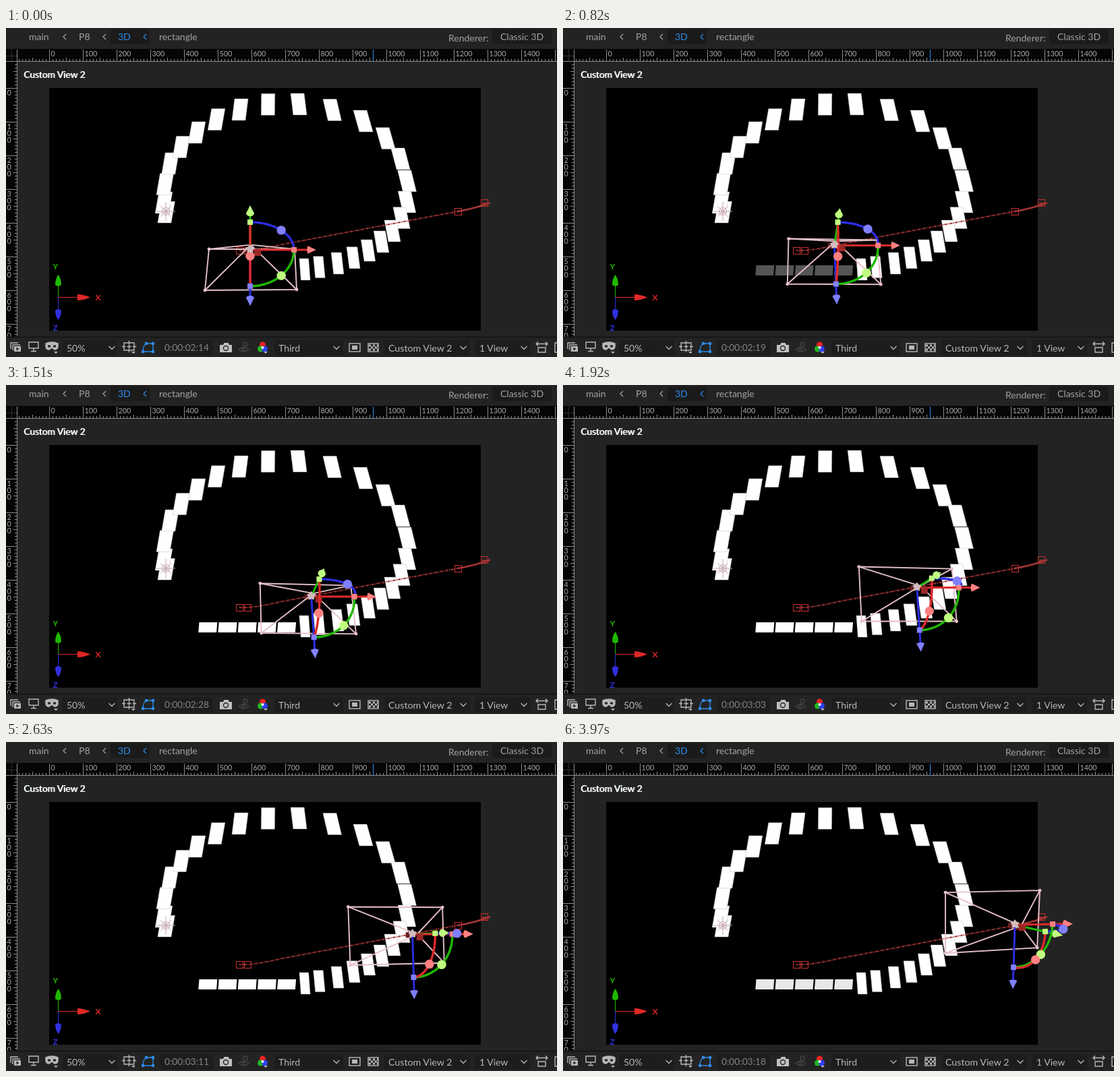
Write an HTML page with a canvas that moves like this. It is 817 by 488 pixels and loops after 4120 ms.

```html
<!DOCTYPE html>
<html lang="en">
<head>
<meta charset="utf-8">
<title>Camera move</title>
<style>
html, body { margin: 0; width: 100%; height: 100%; overflow: hidden; background: #232323; }
svg, canvas { position: absolute; left: 0; top: 0; width: 817px; height: 488px; }
text { font: 14px Lato, sans-serif; fill: #a3a3a3; }
.rule text { font-size: 10.8px; fill: #a8a8a8; }
.bar text { fill: #b8b8b8; }
.axis text { font-size: 12px; font-weight: bold; fill: inherit; }
.title { font-size: 13.7px; }
</style>
</head>
<body>
<svg viewBox="0 0 817 488" xmlns="http://www.w3.org/2000/svg">
  <rect width="817" height="488" fill="#232323"/>

  <!-- header -->
  <g fill="#1b1b1b">
    <rect x="155" y="2" width="58" height="22" rx="2"/>
    <rect x="721" y="2" width="88" height="22" rx="2"/>
  </g>
  <text x="34" y="18">main</text>
  <text x="108" y="18">P8</text>
  <text x="166" y="18" style="fill:#2d8ceb">3D</text>
  <text x="227" y="18">rectangle</text>
  <text x="656" y="20">Renderer:</text>
  <text x="733" y="18">Classic 3D</text>
  <path d="M89 9l-4 4 4 4M148 9l-4 4 4 4" fill="none" stroke="#a3a3a3" stroke-width="1.2"/>
  <path d="M208 9l-4 4 4 4" fill="none" stroke="#2d8ceb" stroke-width="1.2"/>

  <!-- rulers -->
  <path d="M0 31H817V50H17V458H0z" fill="#050505"/>
  <g id="rule" class="rule"></g>

  <!-- viewport -->
  <rect x="64" y="89" width="640" height="360" fill="#000"/>
  <text class="title" x="27" y="74" style="fill:#d4e2ec">Custom View 2</text>
  <text class="title" x="26" y="74" style="fill:#fff">Custom View 2</text>
  <g id="row"></g>
  <g id="tiles" fill="#fff" stroke="#bbb" stroke-width=".5"></g>
  <g id="light" fill="none" stroke="#c0a0a8"></g>
  <g id="track" fill="none" stroke="#a03434"></g>

  <!-- axis widget -->
  <g class="axis">
    <g fill="#20b800"><path d="M77.500 399V378" stroke="#20b800"/><path d="M73 381q0-9 4.500-15q4.500 6 4.500 15q-4.500 4-9 0z"/><text x="69.500" y="358">Y</text></g>
    <g fill="#3030e0"><path d="M77.500 399V420" stroke="#3030e0"/><path d="M73 419q4.500-4 9 0q0 8-4.500 14q-4.500-6-4.500-14z"/><text x="69.500" y="449">Z</text></g>
    <g fill="#e02828"><path d="M78 399.500H108" stroke="#e02828"/><path d="M106 395q8 0 19 4.500q-11 4.500-19 4.500z"/><text x="132.500" y="404">X</text></g>
  </g>

  <!-- toolbar -->
  <rect y="458" width="817" height="30" fill="#232323"/>
  <rect y="457.500" width="817" height="2" fill="#161616"/>
  <g fill="#1d1d1d">
    <rect x="84" y="463" width="81" height="23"/><rect x="228" y="463" width="79" height="23"/>
    <rect x="398" y="463" width="102" height="23"/><rect x="561" y="463" width="127" height="23"/>
    <rect x="695" y="463" width="82" height="23"/>
  </g>
  <g class="bar">
    <text x="90" y="480">50%</text>
    <text id="code" x="235" y="479" style="fill:#858585;font-size:13.700px"></text>
    <text x="404" y="480">Third</text>
    <text x="567" y="480" style="font-size:14.200px">Custom View 2</text>
    <text x="702" y="480">1 View</text>
  </g>
  <path id="downs" fill="none" stroke="#b0b0b0" stroke-width="1.4"/>
  <g fill="none" stroke="#b8b8b8" stroke-width="1.4">
    <path d="M7 476v-9h11M10 478v-8h11"/>
    <rect x="12" y="472" width="10" height="8" fill="#b8b8b8" stroke="none"/><path d="M15.500 473.500v5l4-2.500z" fill="#232323" stroke="none"/>
    <path d="M34 466h14v9h-14zM41 475v4M37 479.500h8"/>
    <path d="M59 468q9-4 18 0v5q-1 4-5 4l-4-3-4 3q-4 0-5-4z" fill="#b8b8b8"/>
    <path d="M62 472h4M70 472h4" stroke="#232323" stroke-width="3"/>
    <path d="M71 480h6l-3 3zM186 480h6l-3 3z" fill="#b8b8b8" stroke="none"/>
    <path d="M175 467h15v11h-15zM182.500 464v5M182.500 476v5M172 472.500h5M188 472.500h5M179.500 472.500h6M182.500 469.500v6"/>
    <path d="M203 480q0-9 5-12h10v12z" stroke="#2d8ceb"/>
    <path d="M201 478h4v4h-4zM206 466h4v4h-4zM216 466h4v4h-4zM216 478h4v4h-4z" fill="#2d8ceb" stroke="none"/>
    <path d="M317 470h5l1.500-3h6l1.500 3h4v11h-18z" fill="#c0c0c0" stroke="none"/>
    <circle cx="326" cy="475" r="3.500" stroke="#232323"/>
    <g stroke="#424242"><circle cx="355" cy="469" r="3"/><path d="M345 477q7-7 15 0q-7 6-15 0z"/><circle cx="352" cy="477" r="2"/></g>
    <g stroke="none"><circle cx="380.500" cy="470" r="4.500" fill="#f02020"/><circle cx="377.500" cy="476" r="4.500" fill="#20b820"/><circle cx="383.500" cy="476" r="4.500" fill="#3040f0"/><circle cx="380.500" cy="474" r="2" fill="#fff"/><path d="M382 480h6l-3 3z" fill="#b8b8b8"/></g>
    <rect x="509" y="468" width="16" height="12"/><rect x="513" y="471" width="8" height="6" fill="#b8b8b8" stroke="none"/>
    <rect x="537" y="468" width="15" height="12"/><path d="M538 471h14M538 477h14" stroke-dasharray="3" stroke-width="3"/><path d="M541 474h11" stroke-dasharray="3" stroke-width="3"/>
    <path d="M786 468.500h17M789 465.500l-3 3 3 3M800 465.500l3 3-3 3M789 474h11v7h-11z"/>
    <path d="M817 467h-3v14h3"/>
  </g>
</svg>
<canvas id="rig" width="817" height="488"></canvas>

<script>
const $ = id => document.getElementById(id);
const line = (x1, y1, x2, y2, c = '#8c8c8c') =>
  `<path d="M${x1} ${y1}L${x2} ${y2}" stroke="${c}"/>`;
const label = (x, y, s) => `<text x="${x}" y="${y}">${s}</text>`;
const range = n => Array.from({ length: n }, (_, i) => i);
const clamp = (v, lo = 0, hi = 1) => Math.min(hi, Math.max(lo, v));

function rulers() {
  let s = line(0, 49.5, 817, 49.5) + line(16.5, 32, 16.5, 457);
  s += '<path d="M0 41.5H16M8.500 32V49" stroke="#777" stroke-dasharray="1 2"/>';
  const tick = i => i % 10 ? (i % 5 ? 3 : 5) : 17;
  for (let i = -9; i <= 150; i++) {
    const x = 64.5 + i * 5;
    s += line(x, 49 - tick(i), x, 49);
    if (i >= 0 && i % 10 === 0) s += label(x + 2, 42, i * 10);
  }
  for (let i = -7; i <= 73; i++) {
    const y = 89.5 + i * 5;
    s += line(16 - tick(i), y, 16, y);
    if (i >= 0 && i % 10 === 0)
      [...String(i * 10)].forEach((d, k) => s += label(1.5, y + 10.5 + k * 10, d));
  }
  return s + line(544.5, 32, 544.5, 49, '#2d8ceb');
}

// every second tile centre along the loop; the rest lie on a spline between them
const loop = [
  [242.5, 280], [234, 259], [243.5, 201], [283, 155], [347, 121], [434, 113], [529.5, 138],
  [585, 194], [594.5, 258], [573, 301], [537, 330], [491.5, 349], [443, 358]
];
const slab = (cx, cy, w, k, h) =>
  `<path d="M${cx - (w + k) / 2} ${cy - h / 2}h${w}l${k} ${h}h${-w}z"/>`;

function loopAt(i) {
  const n = Math.floor(i / 2), knot = j => loop[clamp(j, 0, loop.length - 1)];
  if (i % 2 === 0) return knot(n);
  return [0, 1].map(d =>
    (9 * (knot(n)[d] + knot(n + 1)[d]) - knot(n - 1)[d] - knot(n + 2)[d]) / 16);
}

function tile(i) {
  const [x, y] = loopAt(i + 1), s = clamp((i - 6) / 5);
  const slant = -5.5 + 14.5 * s * s * (3 - 2 * s) - .6 * Math.max(0, i - 12);
  return slab(x, y, 20 - .7 * Math.max(0, i - 14), slant, 31.8);
}

function lamp() {
  const spoke = i => {
    const a = i * Math.PI / 4, r = i % 2 ? 11 : 14;
    return line(237, 272, 237 + r * Math.cos(a), 272 + r * Math.sin(a), '#c8a4ac');
  };
  return '<circle cx="237" cy="272" r="5.5"/><circle cx="237" cy="272" r="2.5"/>' +
    range(8).map(spoke).join('');
}

function track() {
  const tail = 'M670 272Q694 268 716 260', d = 'M346 330H358Q375 329 410 321L670 272' + tail;
  const box = (x, y) => `<rect x="${x - 4.5}" y="${y - 4.5}" width="10" height="10" stroke="#c83030"/>`;
  return `<path d="${d}"/><path d="${d}" stroke-width="2.6" stroke-dasharray="2 6"/>` +
    `<path d="${tail}M706 260.5h9l3-1.500" stroke-width="2.4"/>` +
    box(346, 330) + box(358, 330) + box(670, 272) + box(709, 259);
}

$('rule').innerHTML = rulers();
$('tiles').innerHTML = range(24).map(tile).join('');
$('row').innerHTML = range(5).map(i => slab(299.3 + i * 29.2, 359.5, 26.8, -1.2, 15)).join('');
$('light').innerHTML = lamp();
$('track').innerHTML = track();
$('downs').setAttribute('d', [157, 490, 678, 768].map(x => `M${x - 4.5} 472l4.500 4.500 4.500-4.500`).join(''));

// playback: [ms, scene frame]; the view trails the counter by LAG
const LOOP = 4120, LAG = 70;
const play = [[0, 14], [820, 19], [1510, 25], [1580, 28], [1920, 33], [2630, 41], [3100, 45], [3300, 46], [3970, 48]];

function frameAt(t) {
  const i = clamp(play.findIndex(k => k[0] > t), -1, play.length);
  if (i < 0) return play[play.length - 1][1];
  const [t0, a] = play[i - 1], [t1, b] = play[i];
  return Math.floor(a + (b - a) * (t - t0) / (t1 - t0) + 1e-6);
}

// offsets from the camera: axes X Y Z, frustum TL TR BR BL, at three scene frames
const KEYS = [14, 33, 48];
const shapes = [
  [[65, 0], [0, -41], [0, 54], [-61, -1], [66, -1], [69, 59], [-67, 60]],
  [[62, 0], [22, -14], [4, 63], [-86, -31], [52, -28], [59, 50], [-82, 50]],
  [[56, -1], [45, 10], [-2, 63], [-103, -48], [37, -51], [33, 34], [-103, 42]]
];

function poseAt(p) {
  const w = KEYS.map(a => KEYS.reduce((m, b) => b === a ? m : m * (p - b) / (a - b), 1));
  const mix = j => [0, 1].map(d => w.reduce((s, v, k) => s + v * shapes[k][j][d], 0));
  const dx = 9.06 * (p - 14) - 10 * Math.max(0, Math.sin(Math.PI * (p - 14) / 31));
  const origin = [362 + dx, 329 - .16 * dx - .00009 * dx * dx];
  return [origin, ...range(7).map(mix)];
}

const RED = ['#e02a2a', '#ff8080'], GREEN = ['#20b800', '#c0ff80'], BLUE = ['#2c2ce0', '#8080ff'];
const PINK = '#e6c0c8';
const g = $('rig').getContext('2d');

function stroke(pts, color, width) {
  g.beginPath();
  pts.forEach(([x, y]) => g.lineTo(x, y));
  g.strokeStyle = color;
  g.lineWidth = width;
  g.stroke();
}

function disc([x, y], r, color) {
  g.beginPath();
  g.arc(x, y, r, 0, 7);
  g.fillStyle = color;
  g.fill();
}

function square([x, y], r, color) {
  g.fillStyle = color;
  g.fillRect(x - r, y - r, 2 * r, 2 * r);
}

// arrow head, rounder the more its axis points at the viewer
function cone([ox, oy], [x, y], color) {
  const len = Math.hypot(x, y), flat = Math.sqrt(Math.max(.05, 1 - (len / 66) ** 2));
  g.save();
  g.translate(ox + x * 1.32, oy + y * 1.32);
  g.rotate(Math.atan2(y, x));
  g.fillStyle = color;
  g.beginPath();
  g.ellipse(0, 0, 5.8 * flat, 5.8, 0, 0, 7);
  g.fill();
  g.beginPath();
  g.moveTo(0, -5.8);
  g.lineTo(12 * Math.min(1, len / 41), 0);
  g.lineTo(0, 5.8);
  g.fill();
  g.restore();
}

function drawRig(p) {
  const [o, X, Y, Z, ...rays] = poseAt(p);
  const at = (u, a, v = 0, b = a) => [o[0] + u * a[0] + v * b[0], o[1] + u * a[1] + v * b[1]];
  const arc = (a, b) => range(25).map(i => {
    const q = i / 24 * Math.PI / 2;
    return at(Math.cos(q), a, Math.sin(q), b);
  });
  const corners = rays.map(r => at(1, r));
  const apex = [o[0] + 1 + Y[0] * .18, o[1] + Y[1] * .18];

  g.clearRect(0, 0, 817, 488);
  square([o[0] - 6, o[1] + 1], 4, '#6a2020');
  stroke([...corners, corners[0]], PINK, 1.9);
  corners.forEach(c => {
    stroke([apex, c], PINK, 1.9);
    disc(c, 2.4, PINK);
  });

  const axes = [[Z, BLUE], [Y, GREEN], [X, RED]];
  axes.forEach(([a, c]) => stroke([o, at(1.35, a)], c[0], 3));
  square([o[0] + 11, o[1] + 4], 5, '#9c2828');
  const arcs = [[X, Y, BLUE], [X, Z, GREEN], [Y, Z, RED]];
  arcs.forEach(([a, b, c]) => stroke(arc(a, b), c[0], 3.4));
  axes.forEach(([a, c]) => {
    cone(o, a, c[1]);
    square(at(1, a), 4, c[1]);
  });
  arcs.forEach(([a, b, c]) => disc(at(.71, a, .71, b), 6.7, c[1]));

  // camera node
  g.fillStyle = '#d0bcbe';
  g.beginPath();
  range(10).forEach(i => {
    const a = i * Math.PI / 5 - Math.PI / 2, r = i % 2 ? 4.5 : 7;
    g.lineTo(o[0] + r * Math.cos(a), o[1] - 1 + r * Math.sin(a));
  });
  g.fill();
}

const pad = n => String(n).padStart(2, '0');
const glow = p => clamp((p - 14) / 11) ** 1.4 - .045 * Math.max(0, p - 46);

function draw(t) {
  const code = frameAt(t + LAG), p = frameAt(t);
  const v = Math.round(255 * glow(p));
  $('code').textContent = `0:00:${pad(2 + Math.floor(code / 30))}:${pad(code % 30)}`;
  $('row').setAttribute('fill', `rgb(${v},${v},${v})`);
  drawRig(p);
}

const start = performance.now();
function tick(now) {
  draw(Math.max(0, now - start) % LOOP);
  requestAnimationFrame(tick);
}
tick(start);
</script>
</body>
</html>
```
